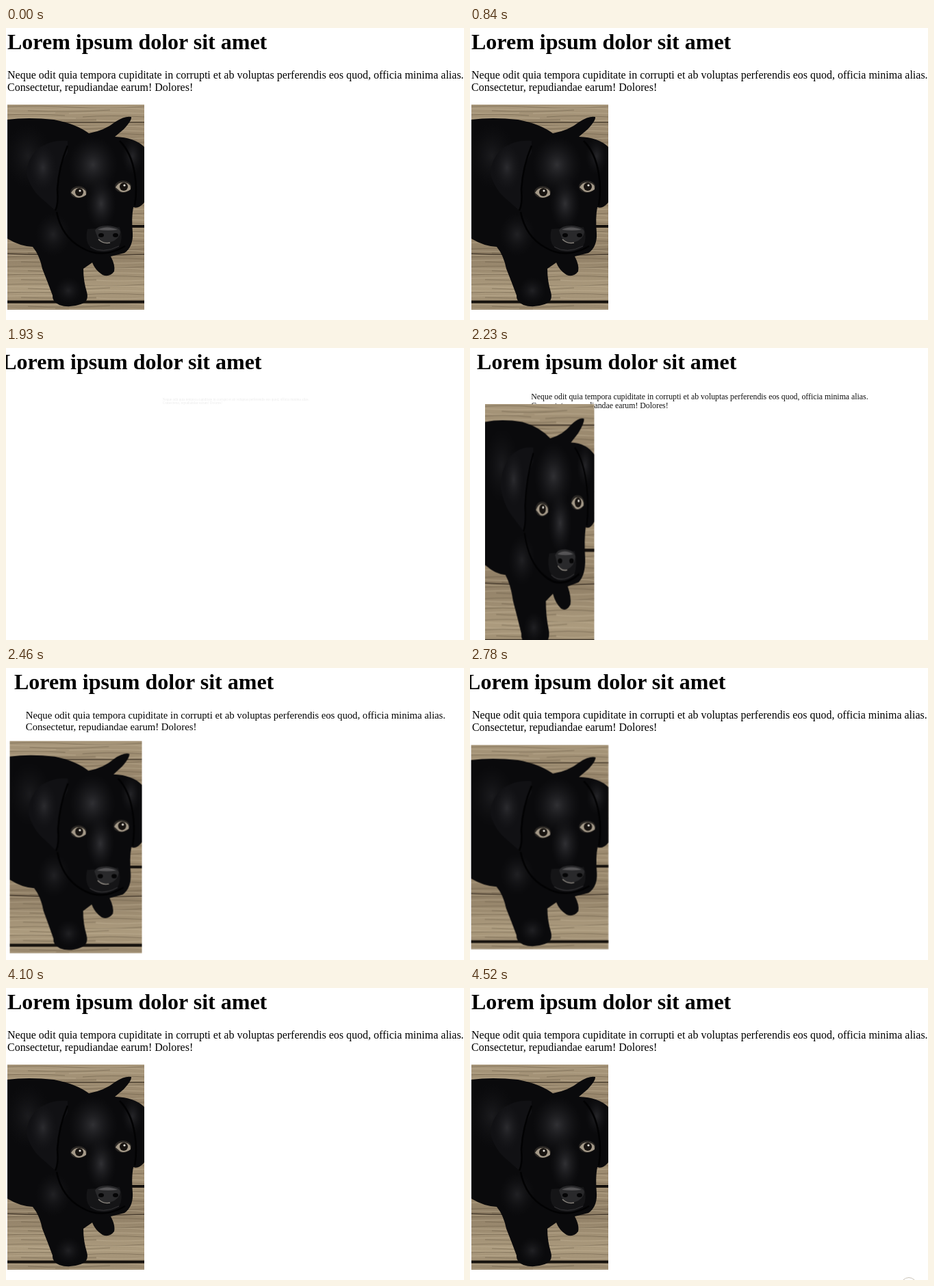
These frames come from a looping animation (669 px wide and 427 px high, 4560 ms). An HTML page:

```html
<!DOCTYPE html>
<html lang="en">
<head>
<meta charset="utf-8">
<title>Lorem ipsum</title>
<style>
  html, body { margin: 0; width: 100%; height: 100%; overflow: hidden; background: #fff; }
  body { position: relative; color: #000; font-family: "Liberation Serif", "Times New Roman", serif; }
  body > * { position: absolute; left: 2px; margin: 0; }
  h1 { top: 2px; width: 668px; font-size: 32px; line-height: 37px; white-space: nowrap;
       animation: shake 971ms 1865ms paused; }
  p { top: 60px; width: 668px; font-size: 16px; line-height: 18px; white-space: nowrap;
      animation: zoom 971ms 1865ms paused; }
  .photo { top: 112px; width: 200px; height: 300px; overflow: hidden;
           animation: rubber 971ms 1865ms paused, unloaded 100ms 1865ms paused; }
  .ring { left: 629px; top: 423px; width: 22px; height: 22px; border: 1px solid #c9c2b6;
          border-radius: 50%; opacity: 0; animation: show 100ms 4500ms paused; }

  @keyframes shake {
    0%, 100% { transform: translateX(0); }
    10%, 30%, 50%, 70%, 90% { transform: translateX(-10px); }
    20%, 40%, 60%, 80% { transform: translateX(10px); }
  }
  @keyframes zoom {
    0% { opacity: 0; transform: scale(.3); }
    50% { opacity: 1; }
  }
  @keyframes rubber {
    0%, 100% { transform: scale(1, 1); }
    30% { transform: scale(1.25, .75); }
    40% { transform: scale(.75, 1.25); }
    50% { transform: scale(1.15, .85); }
    65% { transform: scale(.95, 1.05); }
    75% { transform: scale(1.05, .95); }
  }
  @keyframes unloaded { 0%, 100% { opacity: 0; } }
  @keyframes show { 0%, 100% { opacity: 1; } }
</style>
</head>
<body>
<h1>Lorem ipsum dolor sit amet</h1>
<p>Neque odit quia tempora cupiditate in corrupti et ab voluptas perferendis eos quod, officia minima alias.<br>Consectetur, repudiandae earum! Dolores!</p>
<svg class="photo" viewBox="0 0 200 300" preserveAspectRatio="none">
  <defs>
    <linearGradient id="wood" x2="0" y2="1">
      <stop offset="0" stop-color="#a8977b"/>
      <stop offset=".2" stop-color="#948268"/>
      <stop offset=".6" stop-color="#a08e72"/>
      <stop offset=".72" stop-color="#8f7e65"/>
      <stop offset=".9" stop-color="#ac9b7e"/>
      <stop offset="1" stop-color="#98876d"/>
    </linearGradient>
    <pattern id="grain" width="200" height="26" patternUnits="userSpaceOnUse" fill="none">
      <path stroke="#5d4f3d" stroke-opacity=".45" d="M0 3Q50 1 96 4T200 3M30 9Q90 12 150 8M0 15Q40 13 84 16M110 18Q150 15 200 18M20 22Q80 24 130 22"/>
      <path stroke="#cdbd9f" stroke-opacity=".45" d="M0 6Q60 8 120 6T200 7M0 12Q30 14 70 12M90 13Q150 11 200 13M0 20Q50 18 100 20M130 23Q160 25 200 23"/>
    </pattern>
    <radialGradient id="sheen">
      <stop offset="0" stop-color="#3a3a3e" stop-opacity=".8"/>
      <stop offset="1" stop-color="#1c1c1f" stop-opacity="0"/>
    </radialGradient>
    <g id="eye">
      <ellipse rx="12" ry="9" fill="#2a2724"/>
      <path d="M-11 1Q-6-8 3-6T11 4Q2 10-4 7Z" fill="#a59a89"/>
      <circle cx="1" r="6" fill="#171310"/>
      <circle cx="2" cy="-2" r="1.6" fill="#e8e4dc"/>
    </g>
  </defs>

  <rect width="200" height="300" fill="url(#wood)"/>
  <rect width="200" height="300" fill="url(#grain)"/>
  <g fill="none" stroke="#15110d">
    <path stroke-width="4" d="M180 178H200M0 288.500H200"/>
    <path stroke-width="1.500" stroke="#4b3f31" d="M0 218Q100 222 200 219M0 26H200"/>
  </g>

  <g fill="#0a0a0c">
    <path d="M0 22Q30 18 68 22Q100 28 119 42Q142 38 158 25Q172 16 181 18Q182 23 170 36L157 47Q186 48 200 62V143Q192 153 184 150Q181 165 183 188Q184 208 171 217L151 222Q158 235 156 244Q149 253 139 249Q128 242 124 231L111 240Q111 258 116 274Q120 288 107 292Q90 298 76 293Q65 288 66 279Q59 260 51 240Q47 220 37 208Q18 207 0 196Z"/>
  </g>

  <g fill="url(#sheen)">
    <ellipse cx="30" cy="75" rx="34" ry="48" opacity=".45"/>
    <ellipse cx="125" cy="88" rx="36" ry="42"/>
    <ellipse cx="137" cy="145" rx="22" ry="38"/>
    <ellipse cx="67" cy="190" rx="26" ry="32" opacity=".6"/>
    <ellipse cx="89" cy="272" rx="20" ry="20" opacity=".6"/>
    <ellipse cx="183" cy="75" rx="16" ry="28" opacity=".7"/>
  </g>

  <path d="M88 53Q62 51 43 66Q28 82 28 102Q35 126 52 139L70 155Q75 144 72 127Q75 91 88 70Z" fill="#111114"/>
  <ellipse cx="52" cy="92" rx="20" ry="34" fill="url(#sheen)" opacity=".8"/>
  <g fill="none" stroke="#020203" stroke-width="2.500">
    <path d="M88 60Q75 91 73 124Q75 145 70 155M164 53Q181 70 186 101Q190 124 186 148"/>
    <path d="M72 157Q79 193 108 209Q138 227 172 207"/>
  </g>

  <use href="#eye" x="104" y="128"/>
  <use href="#eye" x="169" y="120"/>

  <path d="M117 182Q112 202 124 211Q143 221 163 208Q170 195 164 179Z" fill="#151517"/>
  <path d="M128 184Q131 177 146 177Q163 178 165 186Q164 197 151 201Q139 204 132 195Z" fill="#29292b"/>
  <path d="M132 183Q145 176 161 183Q147 185 132 183Z" fill="#555456"/>
  <g fill="#050506">
    <ellipse cx="137" cy="191" rx="4" ry="3"/>
    <ellipse cx="158" cy="191" rx="4" ry="3"/>
  </g>
  <path d="M133 197Q140 204 150 202" fill="none" stroke="#88837c" stroke-width="1.500"/>
  <path d="M121 208Q139 219 163 207" fill="none" stroke="#343336"/>
</svg>
<div class="ring"></div>
<script>
  const LOOP = 4560, FIRST = 70, STEP = 76.7;
  const parts = document.getAnimations();

  // The picture is held between steps of a low frame rate.
  function tick() {
    const t = performance.now() % LOOP;
    const held = Math.max(0, FIRST + Math.floor((t - FIRST) / STEP) * STEP);
    for (const part of parts) part.currentTime = held;
    requestAnimationFrame(tick);
  }
  tick();
</script>
</body>
</html>
```
